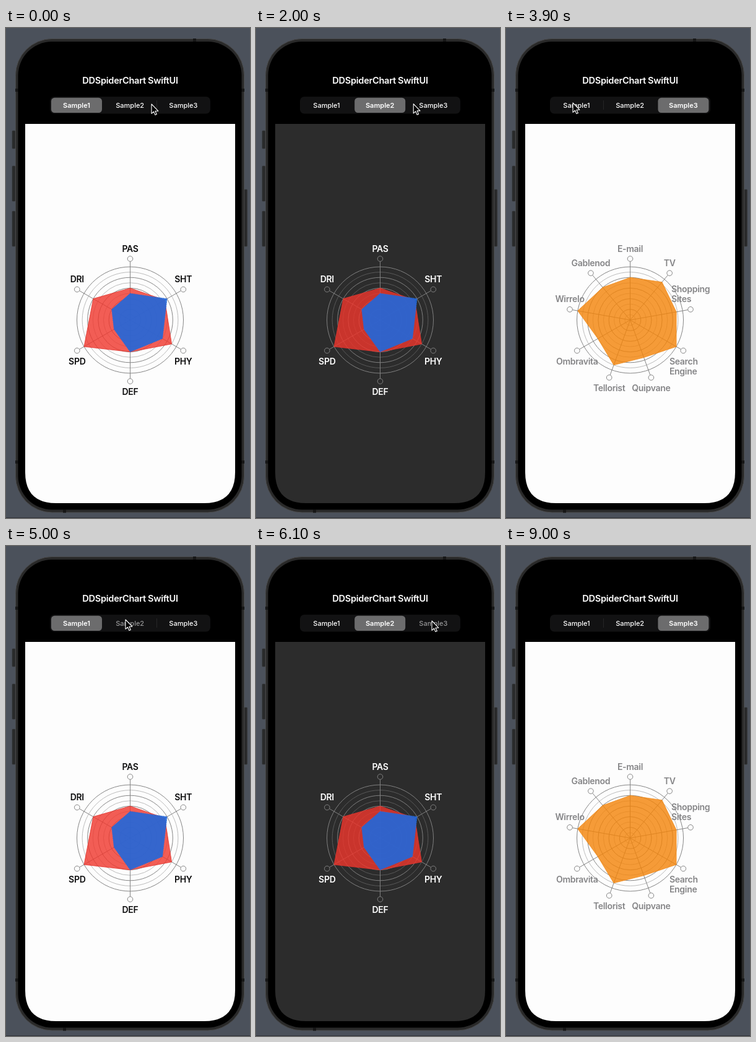
Animation of 394x792 px, one loop 9100 ms. Source, as an HTML page:

```html
<!DOCTYPE html>
<html lang="en">
<head>
<meta charset="utf-8">
<title>Spider chart demo</title>
<style>
  html, body { margin: 0; width: 100%; height: 100%; overflow: hidden; background: #4b515b; }
  svg { display: block; font-family: Inter, "Open Sans", sans-serif; }
  text { dominant-baseline: alphabetic; }
  .title { font-size: 14.6px; font-weight: 600; letter-spacing: -.3px; fill: #fff; text-anchor: middle; }
  .tab { font-size: 11px; text-anchor: middle; fill: #fff; }
  .label { font-size: 14px; font-weight: 600; letter-spacing: -.3px; }
  .poly { vector-effect: non-scaling-stroke; stroke-width: 1; }
</style>
</head>
<body>
<svg id="stage" width="394" height="792" viewBox="0 0 394 792">
  <rect y="791" width="394" height="1" fill="#30343a"/>
  <g fill="#292a2b" stroke="#38393b" stroke-width=".6">
    <rect x="10" y="166" width="5" height="29" rx="1"/>
    <rect x="10" y="223" width="5" height="57" rx="1"/>
    <rect x="10" y="296" width="5" height="57" rx="1"/>
    <rect x="384.5" y="261" width="5" height="92" rx="1"/>
  </g>
  <rect x="15.5" y="17.5" width="369" height="765.5" rx="59" fill="#292929" stroke="#484848"/>
  <path d="M15 100.500h5M380 100.500h5M15 701.500h5M380 701.500h5M304.500 17v5M94.500 778.500v5"
        stroke="#171717" stroke-width="5"/>
  <rect x="19.500" y="22" width="361" height="756.500" rx="55" fill="#000"/>
  <text class="title" x="200.500" y="90.300">DDSpiderChart SwiftUI</text>
  <rect x="71" y="111" width="259" height="27.500" rx="7" fill="#121213"/>
  <path class="divider" d="M157.500 117v15" stroke="#262627"/>
  <path class="divider" d="M243.500 117v15" stroke="#262627"/>
  <rect id="pill" x="73" y="112.700" width="82" height="24.300" rx="5.500" fill="#6c6c6d"/>
  <g id="tabs"></g>
  <path id="screen" d="M31 155H370V718Q370 768 320 768H81Q31 768 31 718Z"/>
  <g id="charts"></g>
  <path id="cursor" d="M0 0V15.300L3.500 12.100L5.900 17.600L8.300 16.500L5.900 11.200H10.800Z"
        fill="#000" stroke="#fff" stroke-width="1.100" stroke-linejoin="round"/>
</svg>
<script>
const LOOP = 9100, STEP = 100, CX = 200.5, CY = 472, R = 86;
const $ = id => document.getElementById(id);

const light = { screen: '#fdfdfd', strong: '#858585', faint: '#bcbcbc', label: '#0c0c0d' };
const dark = { screen: '#2c2c2c', strong: '#808080', faint: '#585858', label: '#fff' };
const stats = {
  labels: ['PAS', 'SHT', 'PHY', 'DEF', 'SPD', 'DRI'],
  sets: [
    { fill: 'rgba(240,54,44,.8)', line: 'rgba(226,52,46,.8)', values: [.6, .75, .9, .6, 1, .8] },
    { fill: 'rgba(33,104,219,.9)', line: '#2f68d2', dash: '1.5 1.5', values: [.5, .8, .7, .6, .35, .4] }
  ]
};
const media = {
  labels: ['E-mail', 'TV', 'Shopping\nSites', 'Search\nEngine', 'Quipvane', 'Tellorist',
           'Ombravita', 'Wirrelo', 'Gablenod'],
  sets: [{ fill: 'rgba(244,132,8,.8)', line: 'rgba(240,138,24,.8)',
           values: [.8, .93, .88, 1, .75, .9, .7, 1, .8] }]
};
const samples = [
  { ...light, ...stats },
  { ...dark, ...stats },
  { ...light, ...media, label: '#858587' }
];

// [time, selected sample]
const taps = [[-2000, 0], [1070, 1], [2370, 2], [4170, 0], [5070, 1], [6170, 2]];
// [time, x, y]
const track = [[0, 235, 123], [300, 222, 117], [600, 208, 126], [1600, 208, 126], [2250, 277, 121],
  [3200, 277, 121], [3900, 108, 121], [4400, 108, 121], [4950, 193, 119], [5300, 193, 119],
  [6000, 284, 121], [6250, 284, 121], [6500, 129, 736], [6600, 129, 736]];

const clamp = v => Math.min(1, Math.max(0, v));
const smooth = v => (v = clamp(v), v * v * (3 - 2 * v));
const mix = (a, b, k) => a + (b - a) * k;
const polar = (i, n, r) => {
  const a = i / n * 2 * Math.PI;
  return [r * Math.sin(a), -r * Math.cos(a)];
};

function labelMarkup(text, x, y, color) {
  const lines = text.split('\n');
  const last = y < 0 ? y - 11.4 : y + 22.2 + 16.5 * (lines.length - 1);
  const left = x - 31 + (y < 0 ? 0 : 8.7);
  const anchor = lines.length > 1 ? 'start' : 'middle';
  return lines.map((line, i) =>
    `<text class="label" x="${lines.length > 1 ? left : x}" y="${last - 16.5 * (lines.length - 1 - i)}"
      text-anchor="${anchor}" fill="${color}">${line}</text>`).join('');
}

function chartMarkup(s) {
  const n = s.labels.length;
  let rings = '', axes = '', labels = '';
  for (let k = 1; k <= 10; k++)
    rings += `<circle r="${R * k / 10}" stroke="${k % 2 ? s.faint : s.strong}"/>`;
  s.labels.forEach((text, i) => {
    const [x, y] = polar(i, n, 99), [ex, ey] = polar(i, n, 94.7);
    axes += `<path d="M0 0L${ex} ${ey}"/><circle cx="${x}" cy="${y}" r="4.3"/>`;
    labels += labelMarkup(text, x, y, s.label);
  });
  const polys = s.sets.map(p => {
    const points = p.values.map((v, i) => polar(i, n, v * R)).join(' ');
    return `<polygon class="poly" points="${points}" fill="${p.fill}" stroke="${p.line}"
      stroke-dasharray="${p.dash || 'none'}"/>`;
  }).join('');
  return `<g class="chart" transform="translate(${CX} ${CY})">
    <g fill="none" stroke="${s.strong}">${rings}${axes}</g>
    <g class="shapes">${polys}</g>${labels}</g>`;
}

$('charts').innerHTML = samples.map(chartMarkup).join('');
$('tabs').innerHTML = samples.map((s, i) =>
  `<text class="tab" x="${114 + 86.2 * i}" y="129">Sample${i + 1}</text>`).join('');
const charts = document.querySelectorAll('.chart');
const shapes = document.querySelectorAll('.shapes');
const tabs = document.querySelectorAll('.tab');
const dividers = document.querySelectorAll('.divider');

// Underdamped spring from 0 to 1, s in seconds
const spring = s => 1 - Math.exp(-27 * s) * (Math.cos(24 * s) + 1.125 * Math.sin(24 * s));

function cursorAt(t) {
  const i = Math.max(1, track.findIndex(p => p[0] >= t));
  const [t0, x0, y0] = track[i - 1], [t1, x1, y1] = track[i];
  const k = smooth((t - t0) / (t1 - t0));
  return [mix(x0, x1, k), mix(y0, y1, k)];
}

function draw(t) {
  const at = taps.findLastIndex(p => p[0] <= t);
  const [start, now] = taps[at];
  const before = at ? taps[at - 1][1] : now;
  const next = taps[at + 1];
  const pressed = next && t >= next[0] - 170 ? next[1] : -1;
  const pos = mix(before, now, smooth((t - start - 30) / 200));

  $('pill').setAttribute('x', 73 + 86.2 * pos);
  dividers[0].style.opacity = clamp(pos - 1);
  dividers[1].style.opacity = clamp(1 - pos);
  tabs.forEach((tab, i) => {
    tab.style.fontWeight = Math.abs(pos - i) < .3 ? 600 : 450;
    tab.style.fill = i === pressed ? '#969697' : '#fff';
  });

  $('screen').setAttribute('fill', samples[now].screen);
  charts.forEach((c, i) => c.style.display = i === now ? '' : 'none');
  shapes[now].setAttribute('transform', `scale(${spring((t - start) / 1000)})`);

  const visible = t < 6600;
  $('cursor').style.display = visible ? '' : 'none';
  if (visible) $('cursor').setAttribute('transform', `translate(${cursorAt(t)})`);
}

function tick(ms) {
  draw(Math.floor(ms % LOOP / STEP) * STEP);
  requestAnimationFrame(tick);
}
draw(0);
requestAnimationFrame(tick);
</script>
</body>
</html>
```
